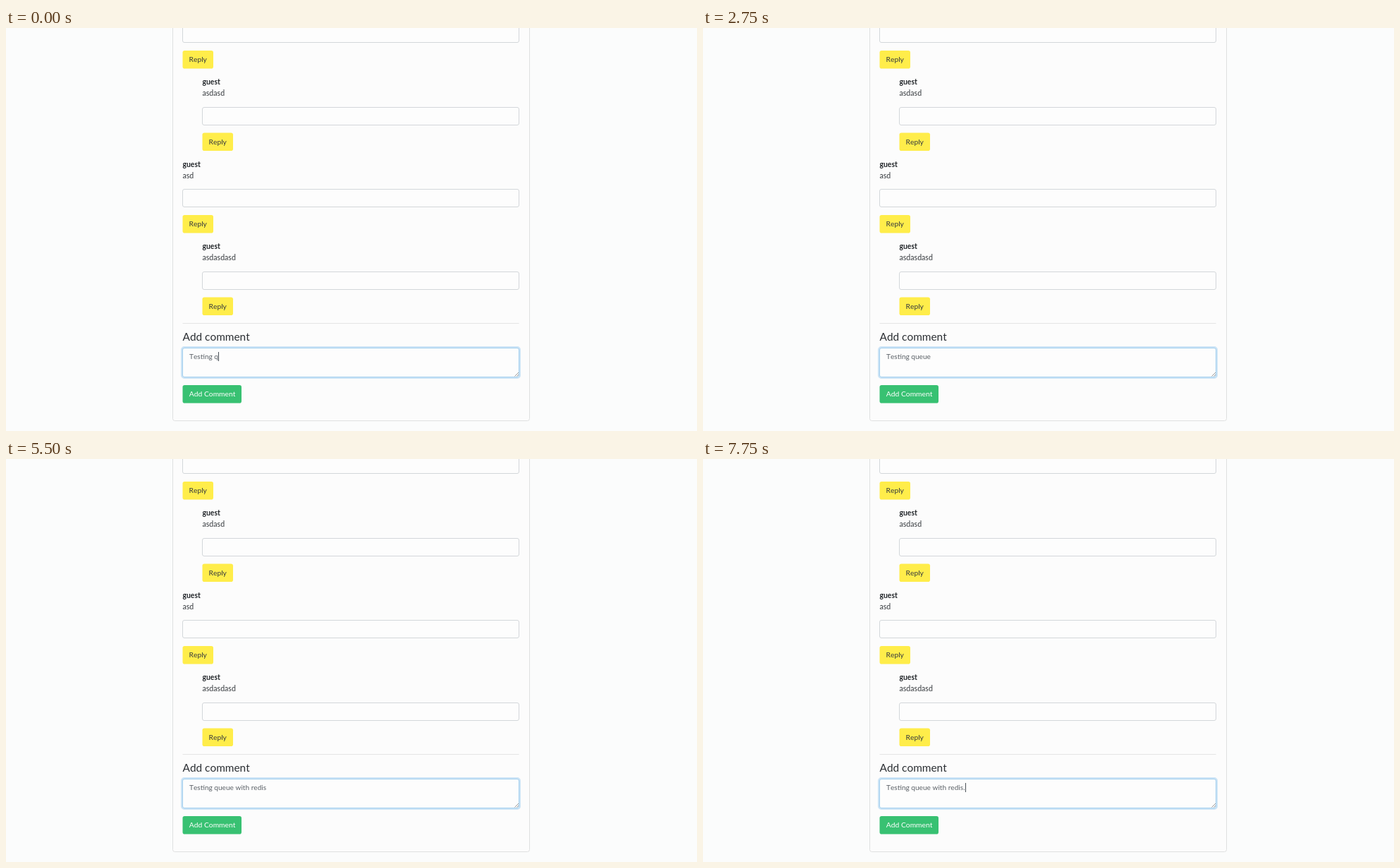
These frames come from a looping animation (980x571 px, 8000 ms). An HTML page:

```html
<!DOCTYPE html>
<html lang="en">
<head>
<meta charset="utf-8">
<title>Comment form</title>
<style>
  html, body { margin: 0; width: 100%; height: 100%; overflow: hidden; background: #fbfcfc; }
  svg { display: block; width: 100%; height: 100%; }
  text { font: 10.3px Lato, "Open Sans", sans-serif; font-kerning: none; white-space: pre; fill: #363a3e; }
  .name { font-size: 10.4px; font-weight: 700; fill: #212529; }
  .body { font-size: 10.6px; }
  .title { font-size: 15.4px; fill: #2b2f33; }
  .light { fill: #fff; }
  .typed { font-size: 10.1px; fill: #5a6066; }
  .caret { fill: #495057; }
  .card { fill: #fcfcfc; stroke: #dfe0e0; }
  .field { fill: #fdfdfd; stroke: #d3d7da; }
  .reply { fill: #ffed4a; }
  .add { fill: #38c172; }
  .glow { fill: none; stroke: #cce4f6; stroke-width: 3; }
  .focus { fill: #fdfdfd; stroke: #a3cfee; }
  .grip { fill: none; stroke: #7d7d7d; stroke-width: .8; }
  .rule { fill: #e4e5e5; }
</style>
</head>
<body>
<svg id="stage" viewBox="0 0 980 571"></svg>
<script>
const LOOP = 8000, BLINK = 500;
const LEFT = 250.5, RIGHT = 727.5, INDENT = 28, PITCH = 116.5;
const stage = document.getElementById('stage');

function add(tag, attrs, content = '') {
  const el = document.createElementNS('http://www.w3.org/2000/svg', tag);
  for (const key in attrs) el.setAttribute(key, attrs[key]);
  el.textContent = content;
  stage.appendChild(el);
  return el;
}
const box = (cls, x, y, width, height, rx = 0) =>
  add('rect', { class: cls, x, y, width, height, rx });
const label = (cls, x, y, content) =>
  add('text', { class: cls, x, y: Math.round(y) }, content);

function comment(x, y, content) {
  label('name', x, y, 'guest');
  label('body', x, y + 16, content);
  box('field', x, Math.floor(y + 32) + .5, RIGHT - x, 25, 2.5);
  box('reply', x, y + 68.5, 43.5, 25.5, 2.8);
  label('', x + 9, y + 84.7, 'Reply');
}

box('card', 236.5, -10.5, 506, 567, 3);
['asd', 'asdasd', 'asd', 'asdasdasd'].forEach((content, i) =>
  comment(LEFT + i % 2 * INDENT, 80 + PITCH * (i - 1), content));

box('rule', LEFT, 418, RIGHT - LEFT, 1);
label('title', LEFT, 443, 'Add comment');
box('glow', LEFT - 1, 452.5, RIGHT - LEFT + 2, 43, 3.5);
box('focus', LEFT, 453.5, RIGHT - LEFT, 41, 2.5);
add('path', { class: 'grip', d: 'M721.5 493.5l5.5-5.5M724.5 493.5l2.5-2.5' });
box('add', LEFT, 506, 83.5, 25.5, 2.8);
label('light', 259.8, 522, 'Add Comment');

const typed = label('typed', 260, 469, '');
const caret = box('caret', 0, 459, 1, 13);

// when each burst of keys lands
const keys = [
  [0, 'Testing q'], [1000, 'u'], [1250, 'eue '], [3750, 'wit'], [4000, 'h '],
  [4250, 'r'], [4500, 'e'], [4750, 'di'], [5000, 's'], [7750, '.']
];

function draw(time) {
  const done = keys.filter(([at]) => at <= time);
  const idle = time - done[done.length - 1][0];
  typed.textContent = done.map(([, chars]) => chars).join('');
  caret.setAttribute('x', Math.round(260 + typed.getComputedTextLength()));
  // every key restarts the blink
  const visible = Math.floor(idle / BLINK) % 2 === 0;
  caret.setAttribute('visibility', visible ? 'visible' : 'hidden');
}

const start = performance.now();
function tick() {
  draw((performance.now() - start) % LOOP);
  requestAnimationFrame(tick);
}
tick();
</script>
</body>
</html>
```
